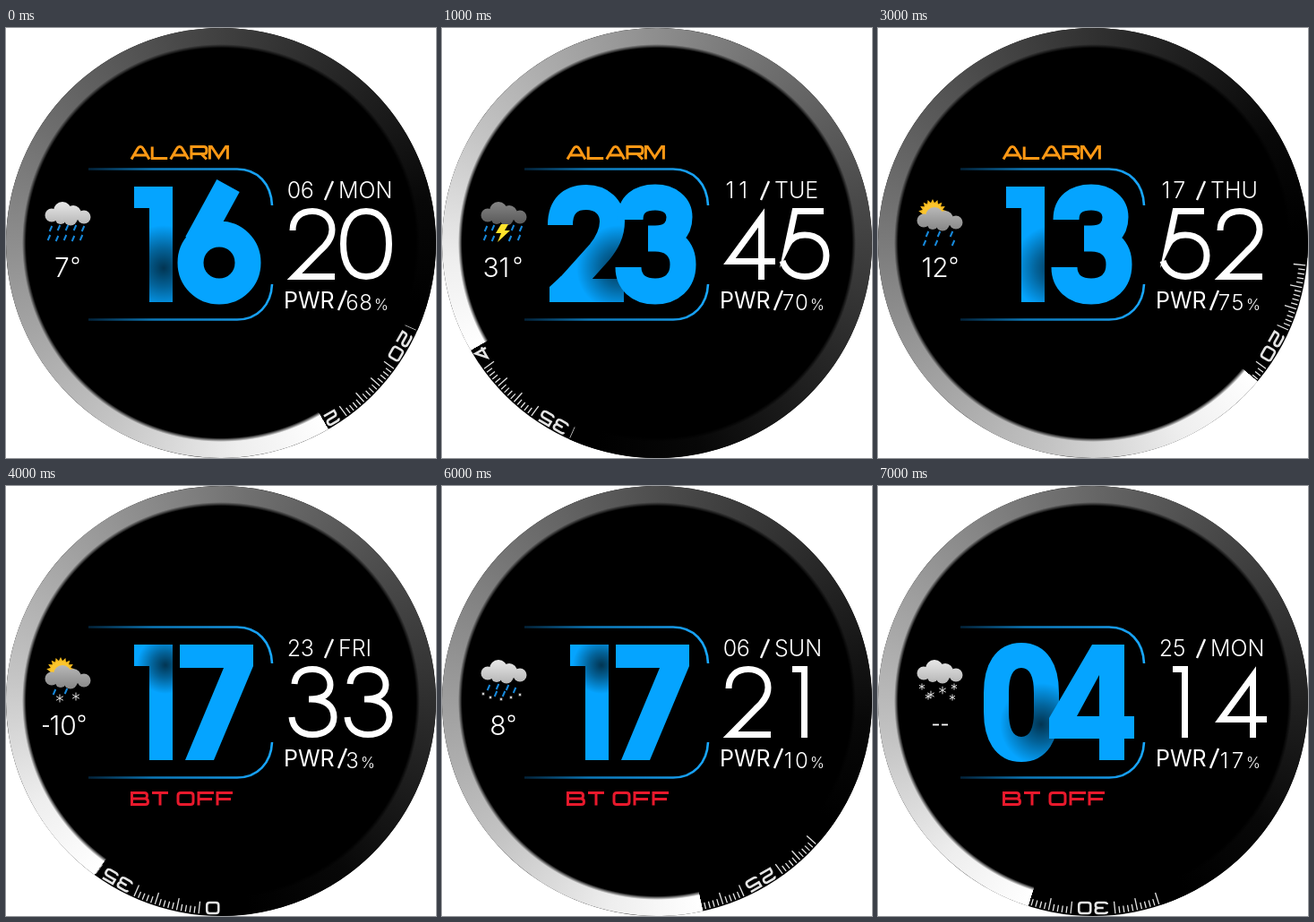
Write an HTML page with a canvas that moves like this. It is 480 by 480 pixels and loops after 8000 ms.

```html
<!DOCTYPE html>
<html lang="en">
<head>
<meta charset="utf-8">
<title>Watch face</title>
<style>
html, body { margin: 0; width: 100%; height: 100%; overflow: hidden; background: #fff; }
canvas { display: block; }
</style>
</head>
<body>
<canvas id="stage" width="480" height="480"></canvas>
<script>
const ctx = document.getElementById('stage').getContext('2d');
const RAD = Math.PI / 180, BLUE = '#05a4ff';

// end: bright end of the bezel in degrees, clockwise from east
const scenes = [
  { hour: '16', min: '20', date: '06', day: 'MON', power: '68', temp: '7', end: 60, sky: 'rain' },
  { hour: '23', min: '45', date: '11', day: 'TUE', power: '70', temp: '31', end: 150, sky: 'storm' },
  { hour: '14', min: '17', date: '26', day: 'WED', power: '72', temp: '6', end: -12, sky: 'sunRain' },
  { hour: '13', min: '52', date: '17', day: 'THU', power: '75', temp: '12', end: 40, sky: 'sunRain' },
  { hour: '17', min: '33', date: '23', day: 'FRI', power: '3', temp: '-10', end: 126, sky: 'sunSleet', off: true },
  { hour: '03', min: '30', date: '14', day: 'SAT', power: '7', temp: '5', end: 100, sky: 'sleet', off: true },
  { hour: '17', min: '21', date: '06', day: 'SUN', power: '10', temp: '8', end: 77.6, sky: 'sleet', off: true },
  { hour: '04', min: '14', date: '25', day: 'MON', power: '17', temp: '', end: 107.5, sky: 'snow', off: true }
];

const tensStroke = {
  0: 'M132 231C132 204 142 189 160 189C178 189 188 204 188 231V252C188 279 178 294 160 294C142 294 132 279 132 252Z',
  2: 'M132 220C132 199 143 189 161 189C178 189 190 200 190 216C190 230 184 240 176 250L141 289'
};
const tensFill = {
  1: 'M143 177H186V306H160V201H143Z',
  2: 'M120 306V289L133 277L150 280H203V306Z'
};
const unitsStroke = {
  3: 'M210 214C210 197 221 189 238 189C254 189 265 198 265 211C265 225 256 235 238 235H230M238 235C258 235 269 247 269 264C269 283 256 294 238 294C219 294 208 283 208 267',
  6: 'M248 176L213 240M238 230C256 230 270 244 270 262C270 280 256 294 238 294C220 294 206 280 206 262C206 244 220 230 238 230Z'
};
const unitsFill = {
  4: 'M239 177H275V257H286V282H275V306H247V282H191V259ZM222 257H247V211Z',
  7: 'M194 177H276V201L232 306H200L243 203H194Z'
};
const shadeSpots = { 3: [198, 268, 48], 4: [182, 266, 46], 6: [176, 268, 48], 7: [178, 200, 32] };

const thin = {
  0: 'M29 3.5C46 3.5 54.5 18 54.5 40C54.5 62 46 76.5 29 76.5C12 76.5 3.5 62 3.5 40C3.5 18 12 3.5 29 3.5Z',
  1: 'M15 3.5H28.5V80',
  2: 'M6 25C6 11 15 3.5 28 3.5C41 3.5 50 12 50 24C50 34 44 41 36 48L8 76.5H53',
  3: 'M8 20C9 9 17 3.5 28 3.5C40 3.5 48 11 48 21C48 31 40 37 24 37M26 37C43 37 52 45 52 57C52 69 42 76.5 28 76.5C15 76.5 6 69 5 57',
  4: 'M42.5 80V11L7 59.5H58',
  5: 'M50 3.5H18L10 41C14 33 21 30 29 30C43 30 53 39 53 53C53 67 43 76.5 29 76.5C16 76.5 7 69 4 59',
  7: 'M-6 3.5H47L15 80'
};

// Wide squared lettering: [advance, path]
const wide = {
  A: [23.2, 'M0 14L7 2Q8 0 10 0Q12 0 13 2L20 14M3.5 9.5H16.5'],
  L: [20.5, 'M0 0V13H17'],
  R: [20.5, 'M0 14V0H14Q17 0 17 3V5Q17 8 14 8H1M11 8L17 14'],
  M: [22, 'M0 14V0H2L10 12L18 0H20V14'],
  B: [22.5, 'M0 0H14Q17 0 17 3Q17 6 15 6.5H1H15Q18 7 18 10Q18 13 15 13H0Z'],
  T: [29, 'M0 0H18M9 0V14'],
  O: [23, 'M3 0H14Q17 0 17 3V10Q17 13 14 13H3Q0 13 0 10V3Q0 0 3 0Z'],
  F: [21, 'M0 14V0H17M0 7H15'],
  0: [18.5, 'M3 0H10Q13 0 13 3V9Q13 12 10 12H3Q0 12 0 9V3Q0 0 3 0Z'],
  1: [11, 'M2 0H6V12'],
  2: [18.5, 'M0 2Q0 0 3 0H10Q13 0 13 3Q13 6 10 6H3Q0 6 0 9V12H13'],
  3: [18.5, 'M0 2Q0 0 3 0H10Q13 0 13 3Q13 6 10 6H4H10Q13 6 13 9Q13 12 10 12H3Q0 12 0 10'],
  4: [18.5, 'M10 13V0L0 9H13'],
  5: [18.5, 'M13 0H0V5H10Q13 5 13 8V9Q13 12 10 12H3Q0 12 0 10']
};

function strokePath(d, color, width) {
  ctx.strokeStyle = color;
  ctx.lineWidth = width;
  ctx.stroke(new Path2D(d));
}

function fillPath(d, color) {
  ctx.fillStyle = color;
  ctx.fill(new Path2D(d), 'evenodd');
}

function line(x1, y1, x2, y2, color, width) {
  strokePath(`M${x1} ${y1}L${x2} ${y2}`, color, width);
}

function disc(x, y, r, color) {
  ctx.fillStyle = color;
  ctx.beginPath();
  ctx.arc(x, y, r, 0, 2 * Math.PI);
  ctx.fill();
}

function lettering(word, x, y, color, width) {
  ctx.save();
  ctx.translate(x, y);
  for (const c of word) {
    strokePath(wide[c][1], color, width);
    ctx.translate(wide[c][0], 0);
  }
  ctx.restore();
}

function text(s, x, y, size, weight = 300, align = 'left') {
  ctx.font = `${weight} ${size}px Inter, sans-serif`;
  ctx.textAlign = align;
  ctx.fillStyle = '#fff';
  ctx.fillText(s, x, y);
}

function cells(s, x, y, size, step) {
  [...s].forEach((c, i) => text(c, x + (i + 0.5) * step, y, size, 300, 'center'));
}

function sector(from, to) {
  ctx.beginPath();
  ctx.moveTo(240, 240);
  ctx.arc(240, 240, 240, from * RAD, to * RAD);
  ctx.closePath();
}

function dial() {
  for (let i = 0; i < 300; i++) {
    const off = i % 25;
    if (off < 5 || off > 20) continue;
    ctx.save();
    ctx.translate(240, 240);
    ctx.rotate(i * 1.2 * RAD);
    line(0, -238.5, 0, i % 5 ? -231 : -225, '#e4e4e4', 1.3);
    ctx.restore();
  }
  for (let m = 0; m < 60; m += 5) {
    const label = String(m);
    if ([...label].some(c => !wide[c])) continue;
    const width = [...label].reduce((sum, c) => sum + wide[c][0], -5.5);
    ctx.save();
    ctx.translate(240, 240);
    ctx.rotate(m * 6 * RAD);
    lettering(label, -width / 2, -237, '#e4e4e4', 2.6);
    ctx.restore();
  }
}

function bezel(end) {
  disc(240, 240, 240, '#000');
  const metal = ctx.createConicGradient(end * RAD, 240, 240);
  [[0, '#fff'], [0.07, '#eee'], [0.17, '#c4c4c4'], [0.3, '#999'], [0.42, '#707070'],
   [0.55, '#494949'], [0.68, '#262626'], [0.8, '#080808'], [0.88, '#000'], [1, '#000']]
    .forEach(([at, color]) => metal.addColorStop(at, color));
  sector(end, end + 324);
  ctx.fillStyle = metal;
  ctx.fill();
  ctx.save();
  sector(end - 36, end);
  ctx.clip();
  dial();
  ctx.restore();
  const face = ctx.createRadialGradient(240, 240, 217.5, 240, 240, 222);
  face.addColorStop(0, '#000');
  face.addColorStop(1, 'rgba(0,0,0,0)');
  disc(240, 240, 222, face);
}

function frameLines() {
  const fade = ctx.createLinearGradient(92, 0, 298, 0);
  fade.addColorStop(0, '#03233a');
  fade.addColorStop(0.35, '#0c78b8');
  fade.addColorStop(0.75, '#1592dc');
  fade.addColorStop(1, '#18a8ff');
  strokePath('M92 157.5H258C281 157.5 296 174 297 198', fade, 2.6);
  strokePath('M92 325.5H258C281 325.5 296 309 297 286', fade, 2.6);
}

function hourDigits([tens, units]) {
  if (tensStroke[tens]) strokePath(tensStroke[tens], BLUE, 28);
  if (tensFill[tens]) fillPath(tensFill[tens], BLUE);
  const [x, y, r] = shadeSpots[units];
  const shade = ctx.createRadialGradient(x, y, 0, x, y, r);
  shade.addColorStop(0, 'rgba(0,0,0,.68)');
  shade.addColorStop(0.45, 'rgba(0,0,0,.4)');
  shade.addColorStop(1, 'rgba(0,0,0,0)');
  disc(x, y, r, shade);
  if (unitsStroke[units]) strokePath(unitsStroke[units], BLUE, 29);
  if (unitsFill[units]) fillPath(unitsFill[units], BLUE);
}

function minuteDigits(digits) {
  [...digits].forEach((c, i) => {
    ctx.save();
    ctx.translate(314 + i * 62 - (c === '0' && i ? 3 : 0), 201);
    strokePath(thin[c], '#fff', 7);
    ctx.restore();
  });
}

function cloud(top, bottom, dy = 0) {
  const tone = ctx.createLinearGradient(0, 194 + dy, 0, 221 + dy);
  tone.addColorStop(0, top);
  tone.addColorStop(1, bottom);
  [[51, 209, 7.5], [63, 204, 10], [75, 207, 9], [87, 211, 7.5], [61, 213, 6], [72, 213, 7.5]]
    .forEach(([x, y, r]) => disc(x, y + dy, r, tone));
}

function sun() {
  for (let a = 190; a <= 350; a += 20) {
    ctx.save();
    ctx.translate(61, 207);
    ctx.rotate(a * RAD);
    fillPath('M9 -3.5L16 0L9 3.5Z', '#f5b91c');
    ctx.restore();
  }
  disc(61, 207, 11.5, '#fbc52e');
}

function drops(points) {
  points.forEach(([x, y]) => line(x + 1.3, y - 3, x - 1.3, y + 3, '#1689dc', 2));
}

function flakes(points, r) {
  points.forEach(([x, y]) => {
    for (let k = 0; k < 3; k++) {
      const dx = r * Math.sin(k * 60 * RAD), dy = r * Math.cos(k * 60 * RAD);
      line(x - dx, y - dy, x + dx, y + dy, '#ddd', 1);
    }
  });
}

const skies = {
  rain() {
    cloud('#e8e8e8', '#b4b4b4');
    drops([[50, 224], [59, 223], [68, 223], [77, 223], [86, 224], [48, 234], [57, 235], [66, 234], [75, 235], [84, 234]]);
  },
  storm() {
    cloud('#858585', '#565656');
    drops([[49, 224], [57, 223], [79, 223], [88, 224], [48, 234], [57, 235], [76, 235], [86, 234]]);
    fillPath('M66 219H74L70 226H76L62 239L66 229H60Z', '#ffe32b');
  },
  sunRain() {
    sun();
    cloud('#b8b8b8', '#858585', 6);
    drops([[55, 230], [68, 230], [82, 230], [52, 240], [65, 240], [84, 240]]);
  },
  sunSleet() {
    sun();
    cloud('#b8b8b8', '#858585', 6);
    drops([[54, 230], [67, 229]]);
    flakes([[60, 237], [78, 235]], 4.5);
  },
  sleet() {
    cloud('#e8e8e8', '#b4b4b4');
    drops([[52, 225], [62, 224], [73, 225], [60, 232], [69, 232], [81, 228]]);
    flakes([[46, 232], [54, 236], [66, 238], [77, 236], [87, 233]], 1.6);
  },
  snow() {
    cloud('#e8e8e8', '#b4b4b4');
    flakes([[49, 224], [85, 224], [56, 235], [83, 236]], 3.5);
    flakes([[59, 233], [72, 228]], 4.3);
  }
};

function temperature(value) {
  if (!value) {
    line(61, 266.5, 68, 266.5, '#fff', 1.8);
    line(71, 266.5, 78, 266.5, '#fff', 1.8);
    return;
  }
  const digits = value.replace('-', ''), right = digits.length > 1 ? 77 : 70;
  const x = right - digits.length * 15;
  cells(digits, x, 278, 30, 15);
  if (value !== digits) line(41, 268, 48, 268, '#fff', 1.8);
  ctx.strokeStyle = '#fff';
  ctx.lineWidth = 1.4;
  ctx.beginPath();
  ctx.arc(right + 7.5, 259.5, 3.3, 0, 2 * Math.PI);
  ctx.stroke();
}

function draw(s) {
  ctx.fillStyle = '#fff';
  ctx.fillRect(0, 0, 480, 480);
  bezel(s.end);
  frameLines();
  hourDigits(s.hour);
  if (s.off) lettering('BTOFF', 140.5, 342.5, '#e8192c', 3);
  else lettering('ALARM', 140, 132.5, '#ff9814', 3);
  cells(s.date, 314, 190, 25, 14.8);
  line(356, 192, 365, 171, '#fff', 2.4);
  text(s.day, 371, 190, 25);
  minuteDigits(s.min);
  text('PWR', 310, 312.5, 25, 400);
  line(371, 315, 380, 293, '#fff', 2.4);
  cells(s.power, 379, 314.5, 24, 15);
  text('%', 381 + s.power.length * 15, 314.5, 17);
  skies[s.sky]();
  temperature(s.temp);
}

function tick() {
  draw(scenes[Math.floor(performance.now() / 1000) % scenes.length]);
  requestAnimationFrame(tick);
}
tick();
</script>
</body>
</html>
```
